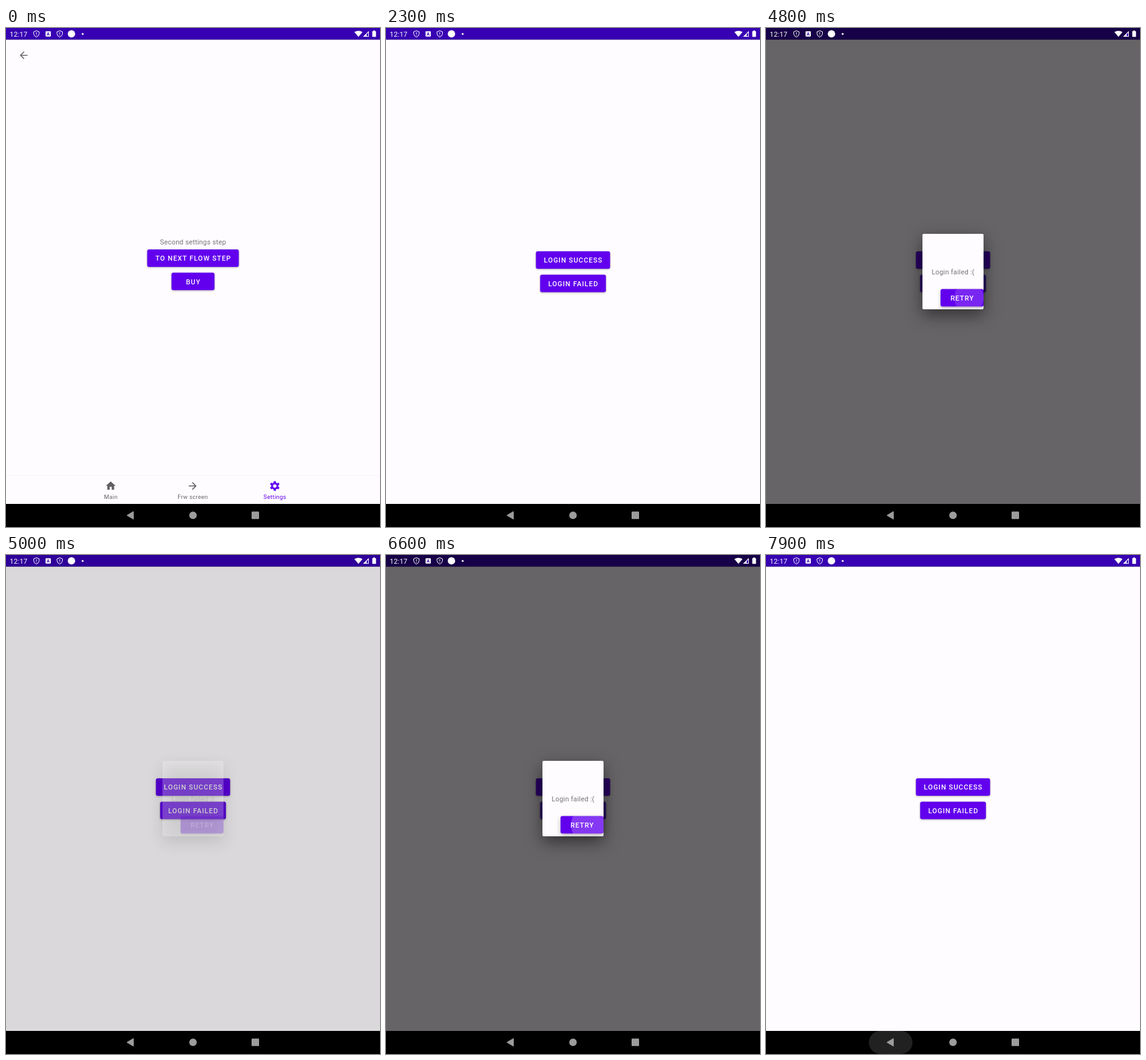
These frames come from a looping animation (600x800 px, 8 s). An HTML page with a canvas:

```html
<!DOCTYPE html>
<html lang="en">
<head>
<meta charset="utf-8">
<style>
html, body { margin: 0; width: 100%; height: 100%; overflow: hidden; background: #000; }
canvas { display: block; width: 600px; height: 800px; }
</style>
</head>
<body>
<canvas id="stage" width="600" height="800"></canvas>
<script>
const ctx = document.getElementById('stage').getContext('2d');
const LOOP = 8000;
const PAPER = '#fffcff', PURPLE = '#6200ee', BAR = '#3700b3';
const BAR_H = 18.7, FLOOR = 763, WINDOW_H = 780;

const clamp = v => Math.max(0, Math.min(1, v));
const lerp = (a, b, p) => a + (b - a) * p;
const ramp = (t, start, length) => clamp((t - start) / length);

// cubic-bezier(.4, 0, .2, 1)
function ease(x) {
  let lo = 0, hi = 1, s = 0.5;
  for (let i = 0; i < 20; i++) {
    s = (lo + hi) / 2;
    const bx = 1.2 * s * (1 - s) ** 2 + 0.6 * s * s * (1 - s) + s ** 3;
    if (bx < x) lo = s; else hi = s;
  }
  return s * s * (3 - 2 * s);
}

function rect(x, y, w, h, color) {
  ctx.fillStyle = color;
  ctx.fillRect(x, y, w, h);
}

function round(x, y, w, h, r) {
  ctx.beginPath();
  ctx.roundRect(x, y, w, h, r);
}

function disc(x, y, r, color) {
  ctx.fillStyle = color;
  ctx.beginPath();
  ctx.arc(x, y, r, 0, Math.PI * 2);
  ctx.fill();
}

function text(str, x, y, size, color, { weight = 400, gap = 0, align = 'center' } = {}) {
  ctx.font = `${weight} ${size}px Roboto, sans-serif`;
  ctx.letterSpacing = gap + 'px';
  ctx.textAlign = align;
  ctx.textBaseline = 'alphabetic';
  ctx.fillStyle = color;
  ctx.fillText(str, x + (align === 'center' ? gap / 2 : 0), y);
  ctx.letterSpacing = '0px';
}

function shadow(y, blur, alpha) {
  ctx.shadowColor = `rgba(0,0,0,${alpha})`;
  ctx.shadowOffsetY = y;
  ctx.shadowBlur = blur;
}

// A press is { at, until, x }: touch start, release and touch position.
function button(label, x, y, w, t, presses = []) {
  const h = 28;
  const press = presses.find(p => t >= p.at && t < p.until + 200);
  const lift = press ? ramp(t, press.at, 100) * (1 - ramp(t, press.until, 100)) : 0;
  ctx.save();
  shadow(lerp(1, 3, lift), lerp(3, 8, lift), 0.32);
  ctx.fillStyle = PURPLE;
  round(x, y, w, h, 3);
  ctx.fill();
  ctx.restore();
  if (press) {
    const p = ease(ramp(t, press.at, 225));
    const r = lerp(w * 0.3, Math.hypot(w, h) / 2, p);
    const glow = 0.22 * ramp(t, press.at, 75) * (1 - ramp(t, press.until, 200));
    ctx.save();
    round(x, y, w, h, 3);
    ctx.clip();
    disc(lerp(press.x, x + w / 2, p), y + h / 2, r, `rgba(255,255,255,${glow})`);
    ctx.restore();
  }
  text(label, x + w / 2, y + 18.4, 10.95, '#fff', { weight: 500, gap: 0.98 });
}

function icon(d, x, y, color) {
  ctx.save();
  ctx.translate(x, y);
  ctx.scale(0.78, 0.78);
  ctx.translate(-12, -12);
  ctx.fillStyle = color;
  ctx.fill(new Path2D(d));
  ctx.restore();
}

function gear(x, y) {
  ctx.save();
  ctx.translate(x, y);
  ctx.scale(0.78, 0.78);
  ctx.fillStyle = PURPLE;
  for (let i = 0; i < 6; i++) {
    ctx.rotate(Math.PI / 3);
    ctx.beginPath();
    ctx.moveTo(-3.1, 0);
    ctx.lineTo(-2.2, -9.6);
    ctx.lineTo(-1.8, -10);
    ctx.lineTo(1.8, -10);
    ctx.lineTo(2.2, -9.6);
    ctx.lineTo(3.1, 0);
    ctx.fill();
  }
  disc(0, 0, 7.3, PURPLE);
  disc(0, 0, 3.5, PAPER);
  ctx.restore();
}

const ARROW_BACK = 'M20 11H7.83l5.59-5.59L12 4l-8 8 8 8 1.41-1.41L7.83 13H20z';
const ARROW_NEXT = 'M12 4l-1.41 1.41L16.17 11H4v2h12.17l-5.58 5.59L12 20l8-8z';
const HOME = 'M10 20v-6h4v6h5v-8h3L12 3 2 12h3v8z';

function page() {
  rect(0, 0, 600, BAR_H, BAR);
  rect(0, BAR_H, 600, FLOOR - BAR_H, PAPER);
  rect(0, FLOOR, 600, WINDOW_H - FLOOR, '#000');
}

function settingsPage(t) {
  page();
  icon(ARROW_BACK, 28.4, 43.7, '#6c6b6d');
  text('Second settings step', 300, 347, 10.95, '#757477', { gap: 0.19 });
  button('TO NEXT FLOW STEP', 226.5, 355, 147, t);
  button('BUY', 265.5, 392.3, 69, t);
  rect(0, 716.8, 600, 1, '#f4f2f5');
  if (t > 780) {
    ctx.save();
    ctx.beginPath();
    ctx.rect(0, 717, 600, FLOOR - 717);
    ctx.clip();
    const p = ease(ramp(t, 780, 225));
    const glow = 0.1 * ramp(t, 780, 75) * (1 - ramp(t, 950, 200));
    disc(299.5, 740, lerp(20, 50, p), `rgba(98,0,238,${glow})`);
    ctx.restore();
  }
  icon(HOME, 168, 734, '#605f62');
  icon(ARROW_NEXT, 299.5, 734.2, '#605f62');
  gear(431.2, 734.2);
  text('Main', 168, 754.6, 9.35, '#6a696c', { gap: 0.31 });
  text('Frw screen', 299.5, 754.6, 9.35, '#6a696c', { gap: 0.31 });
  text('Settings', 431.2, 754.6, 9.35, PURPLE, { gap: 0.31 });
}

function profilePage(t) {
  page();
  button('OPEN PROFILE', 245, 377, 110, t, [{ at: 1860, until: 2400, x: 320 }]);
}

const FAIL_TAPS = [{ at: 3559, until: 3740, x: 328 }, { at: 5430, until: 5600, x: 328 }];
const RETRY_TAPS = [{ at: 4750, until: 4850, x: 328 }, { at: 6521, until: 6620, x: 338 }];
const DIALOGS = [{ open: 3800, close: 4880 }, { open: 5585, close: 6630 }];

function loginPage(t) {
  page();
  button('LOGIN SUCCESS', 240.5, 358, 119, t);
  button('LOGIN FAILED', 247.3, 395.5, 105.5, t, FAIL_TAPS);
}

function dialog(t, { open, close }) {
  const out = ramp(t, close, 160);
  const shown = (1 - (1 - ramp(t, open, 155)) ** 2) * (1 - out);
  if (shown <= 0) return;
  rect(0, 0, 600, FLOOR, `rgba(0,0,0,${0.6 * ramp(t, open, 200) * (1 - out)})`);
  ctx.save();
  ctx.globalAlpha = shown;
  ctx.save();
  shadow(9, 26, 0.5);
  ctx.fillStyle = PAPER;
  round(251, 330, 98, 121, 2);
  ctx.fill();
  ctx.restore();
  text('Login failed :(', 300, 395, 10.95, '#757477', { gap: 0.19 });
  button('RETRY', 280, 418.5, 69, t, RETRY_TAPS);
  ctx.restore();
}

function shield(x) {
  ctx.strokeStyle = '#fff';
  ctx.lineWidth = 1;
  ctx.stroke(new Path2D(`M${x} 4.4l4.3 1.6v3.3q0 3.5-4.3 5.2q-4.3-1.7-4.3-5.2V6z`));
  rect(x - 0.5, 6.7, 1, 3.2, '#fff');
  rect(x - 0.5, 10.9, 1, 1, '#fff');
}

function statusIcons() {
  text('12:17', 6, 13.6, 11, '#fff', { gap: 0.2, align: 'left' });
  shield(48.8);
  ctx.fillStyle = '#fff';
  round(63.5, 5.2, 8.4, 8.6, 1);
  ctx.fill();
  text('A', 67.7, 12, 7, BAR, { weight: 700 });
  shield(86.2);
  disc(105, 9.4, 5.9, '#fff');
  disc(123, 9.5, 1.6, '#fff');
  ctx.fillStyle = '#fff';
  ctx.fill(new Path2D('M565.4 14.2L558.9 6.6q6.5-4.4 13 0z'));
  ctx.fill(new Path2D('M582 4.8V14H572.8z'));
  ctx.fillStyle = BAR;
  ctx.fill(new Path2D('M581 7.6V13H578.6V9.8z'));
  ctx.fillStyle = '#fff';
  rect(589.2, 4, 2.8, 2, '#fff');
  round(587.6, 5, 6, 9.2, 0.8);
  ctx.fill();
}

function navButtons(t) {
  const ink = '#9d9c9d';
  if (t >= 7900) {
    ctx.fillStyle = '#212121';
    round(165, 763, 70, 37, 18.5);
    ctx.fill();
  }
  ctx.fillStyle = ctx.strokeStyle = ink;
  ctx.lineJoin = 'round';
  ctx.lineWidth = 1;
  const back = new Path2D('M194 781.3L204.4 775.2V787.4z');
  ctx.fill(back);
  ctx.stroke(back);
  ctx.lineJoin = 'miter';
  disc(300, 781.3, 6, ink);
  round(394, 775.3, 12, 12, 1);
  ctx.fill();
}

function draw(t) {
  rect(0, 0, 600, 800, '#000');
  if (t < 1000) {
    settingsPage(t);
  } else if (t < 2300) {
    const grow = ramp(t, 1000, 390);
    if (grow < 1) {
      settingsPage(t);
      ctx.globalAlpha = ramp(t, 1000, 200);
      rect(0, 0, 600, WINDOW_H, '#6b6a6b');
      ctx.globalAlpha = ramp(t, 1000, 100);
    }
    const scale = lerp(0.85, 1, ease(grow));
    ctx.save();
    ctx.translate(300, 390);
    ctx.scale(scale, scale);
    ctx.translate(-300, -390);
    profilePage(t);
    ctx.restore();
    ctx.globalAlpha = 1;
  } else {
    loginPage(t);
    DIALOGS.forEach(d => dialog(t, d));
  }
  statusIcons();
  navButtons(t);
}

const begin = performance.now();
function tick() {
  draw((performance.now() - begin) % LOOP);
  requestAnimationFrame(tick);
}
tick();
</script>
</body>
</html>
```
